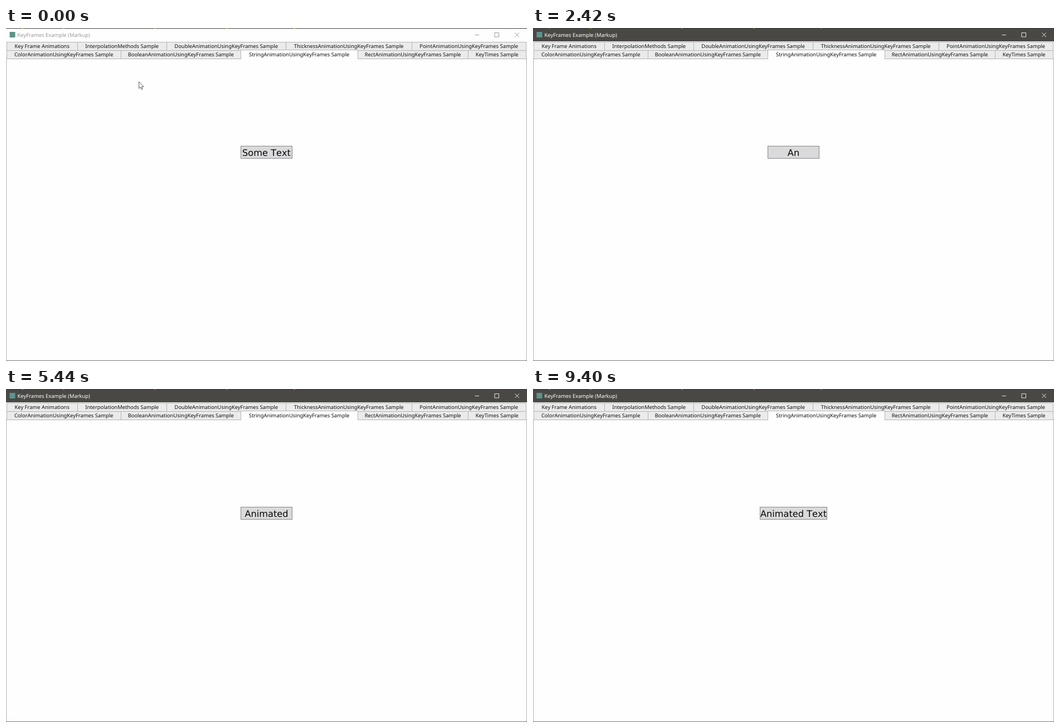
Recreate the animation shown at these times as an HTML page. Size 935 by 599 pixels, loop 9700 ms.

```html
<!DOCTYPE html>
<html lang="en">
<head>
<meta charset="utf-8">
<title>Key frames</title>
<style>
  html, body { margin: 0; width: 100%; height: 100%; overflow: hidden; background: #fefefe; }
  #stage { position: relative; width: 935px; height: 599px; overflow: hidden; text-rendering: geometricPrecision; }
  svg { position: absolute; left: 0; top: 0; }
  svg text { font: 9.4px "Noto Sans", "Open Sans", sans-serif; }
  #tabs text { text-anchor: middle; fill: #111; }
  #tabs rect { fill: #ebebeb; stroke: #b4b4b4; }
  #tabs .selected { fill: #fefefe; }
  #bar { fill: #fefefe; }
  #caption { fill: #999; }
  #controls { fill: none; stroke: #999; }
  .active #bar { fill: #4a4845; }
  .active #caption { fill: #fff; }
  .active #controls { stroke: #e6e6e6; }
  #row { position: absolute; top: 212px; width: 100%; display: flex; justify-content: center; }
  #button {
    box-sizing: border-box; min-width: 93px; height: 23px;
    border: 1px solid #888; background: #dadadc; color: #080808;
    font: 16.2px/23px "DejaVu Sans", Verdana, sans-serif; font-kerning: none;
    text-align: center; white-space: nowrap;
  }
  #button.hover { border-color: #5c93c0; background: #bee6fd; }
</style>
</head>
<body>
<div id="stage">
  <svg width="935" height="599" viewBox="0 0 935 599">
    <rect id="bar" width="935" height="24"/>
    <rect width="935" height="1" fill="#3a3a3a"/>
    <path d="M28 .5h3M102 .5h3M266 .5h3M395 .5h3M516 .5h3" stroke="#a8963c"/>
    <rect x="6.5" y="7" width="10" height="10" fill="#5b948c"/>
    <text id="caption" x="20.5" y="15.5">KeyFrames Example (Markup)</text>
    <path id="controls" d="M841.5 12.5h7.5M877 8.5h7.5v7.5h-7.5zM913.5 8.5l7.5 7.5m0-7.5l-7.5 7.5"/>
    <rect x=".5" y="55.5" width="934" height="543" fill="#fefefe" stroke="#b0b0b0"/>
    <path d="M0 598.5h935" stroke="#777"/>
    <g id="tabs"></g>
  </svg>
  <div id="row"><div id="button">Some Text</div></div>
  <svg width="935" height="599" viewBox="0 0 935 599">
    <path id="cursor" d="M0 0V12l2.7-2.5 1.9 4.3 1.9-.8-1.8-4.2h3.9z" fill="#fff" stroke="#333" stroke-width=".8"/>
  </svg>
</div>
<script>
const LOOP = 9700;
const byId = id => document.getElementById(id);
const [stage, tabs, button, cursor] = ["stage", "tabs", "button", "cursor"].map(byId);

function addNode(name, attributes, text = "") {
  const node = document.createElementNS("http://www.w3.org/2000/svg", name);
  for (const key in attributes) node.setAttribute(key, attributes[key]);
  node.textContent = text;
  tabs.append(node);
}

function addTab(left, right, top, label, selected) {
  const y = selected ? top - 1 : top;
  addNode("rect", { x: left, y, width: right - left, height: selected ? 16 : 15, class: selected ? "selected" : "" });
  if (selected) addNode("path", { d: `M${left + .5} 55.5H${right - .5}`, stroke: "#fefefe", "stroke-width": 2 });
  addNode("text", { x: (left + right) / 2 - .3, y: top + (selected ? 10.2 : 10.7) }, label);
}

function addTabRow(top, edges, labels, selected) {
  labels.forEach((label, i) => addTab(edges[i], edges[i + 1], top, label, i === selected));
}

addTabRow(25.5, [1.5, 128.5, 288.5, 502.5, 728.5, 933.5], [
  "Key Frame Animations", "InterpolationMethods Sample", "DoubleAnimationUsingKeyFrames Sample",
  "ThicknessAnimationUsingKeyFrames Sample", "PointAnimationUsingKeyFrames Sample"
]);
addTabRow(40.5, [1.5, 206.5, 421.5, 631.5, 829.5, 933.5], [
  "ColorAnimationUsingKeyFrames Sample", "BooleanAnimationUsingKeyFrames Sample",
  "StringAnimationUsingKeyFrames Sample", "RectAnimationUsingKeyFrames Sample", "KeyTimes Sample"
], 2);

// Each entry is [start time, value]; values hold until the next entry.
const phrase = "Animated Text";
const typeTimes = [1800, 2420, 2880, 3320, 3920, 4380, 4840, 5440, 5900, 6360, 6960, 7420, 7880];
const labels = [[0, "Some Text"], [720, ""], ...typeTimes.map((time, i) => [time, phrase.slice(0, i + 1)])];
const valueAt = (steps, time) => steps.findLast(([start]) => start <= time)[1];

// The pointer is sampled at these times: it eases to the button, clicks, then speeds off downwards.
const PRESS = 720, GONE = 1180;
const samples = [0, 120, 280, 420, 560, PRESS, 860, 1020];
const smooth = u => u * u * u * (10 - 15 * u + 6 * u * u);

function pointerAt(time) {
  const sample = samples.findLast(start => start <= time);
  const arrive = smooth(Math.min(1, sample / 540));
  const leave = Math.max(0, (sample - PRESS) / 300) ** 3;
  return [238.6 + 222 * arrive + 4 * leave, 96.8 + 126.7 * arrive + 73.5 * leave];
}

const overButton = ([x, y]) => x >= 421 && x < 514 && y >= 212 && y < 235;

function draw(time) {
  const label = valueAt(labels, time);
  if (button.textContent !== label) button.textContent = label;
  const point = pointerAt(time);
  button.classList.toggle("hover", time < GONE && overButton(point));
  stage.classList.toggle("active", time >= PRESS);
  cursor.style.visibility = time < GONE ? "visible" : "hidden";
  cursor.setAttribute("transform", `translate(${point})`);
}

const begin = performance.now();
function tick() {
  draw((performance.now() - begin) % LOOP);
  requestAnimationFrame(tick);
}
tick();
</script>
</body>
</html>
```
